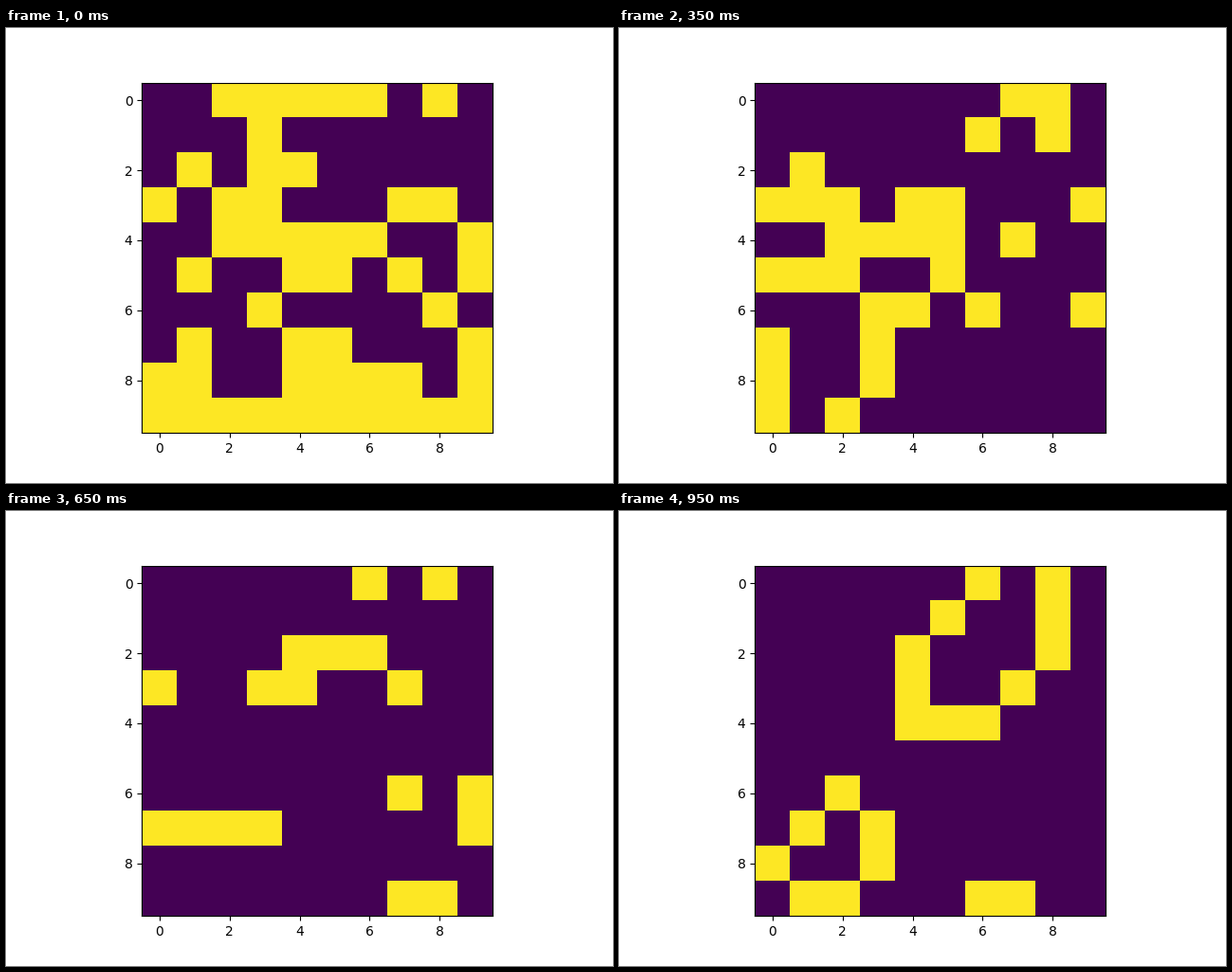
A matplotlib script that plays this animation: 640 by 480 pixels, repeating every 1000 ms.

```python
import matplotlib.pyplot as plt
import numpy as np
from matplotlib.animation import FuncAnimation

SIZE = 10
FRAMES = 20
INTERVAL = 50  # ms


def first_generation():
    """Build the starting colony from a few bars, columns and dots."""
    grid = np.zeros((SIZE, SIZE), dtype=int)

    # upper half: two bars joined by a stem
    grid[:5:4, 2:7] = 1
    grid[:4, 3] = 1
    grid[2, 1:5:3] = 1
    grid[3, :3:2] = 1
    grid[3, 7:9] = 1

    # lower half: columns cut by a gap, standing on a full floor
    for column in (1, 4, 5, 9):
        grid[5:9, column] = 1
    grid[6] = 0
    grid[6, 3::5] = 1
    grid[8, 6:8] = 1
    grid[9] = 1

    # loose cells
    grid[0, 8] = grid[4, 9] = grid[5, 7] = grid[8, 0] = 1
    return grid


def next_generation(grid):
    """Conway's Game of Life on a torus."""
    block = sum(
        np.roll(grid, (dy, dx), axis=(0, 1))
        for dy in (-1, 0, 1)
        for dx in (-1, 0, 1)
    )
    return ((block == 3) | ((block == 4) & (grid == 1))).astype(int)


generations = [first_generation()]
while len(generations) < FRAMES:
    generations.append(next_generation(generations[-1]))

fig, ax = plt.subplots(figsize=(6.4, 4.8), dpi=100)
image = ax.imshow(generations[0], cmap="viridis", vmin=0, vmax=1,
                  interpolation="nearest")


def update(frame):
    image.set_data(generations[frame])
    return (image,)


animation = FuncAnimation(fig, update, frames=FRAMES, interval=INTERVAL,
                          repeat=True, repeat_delay=0)
plt.show()
```
